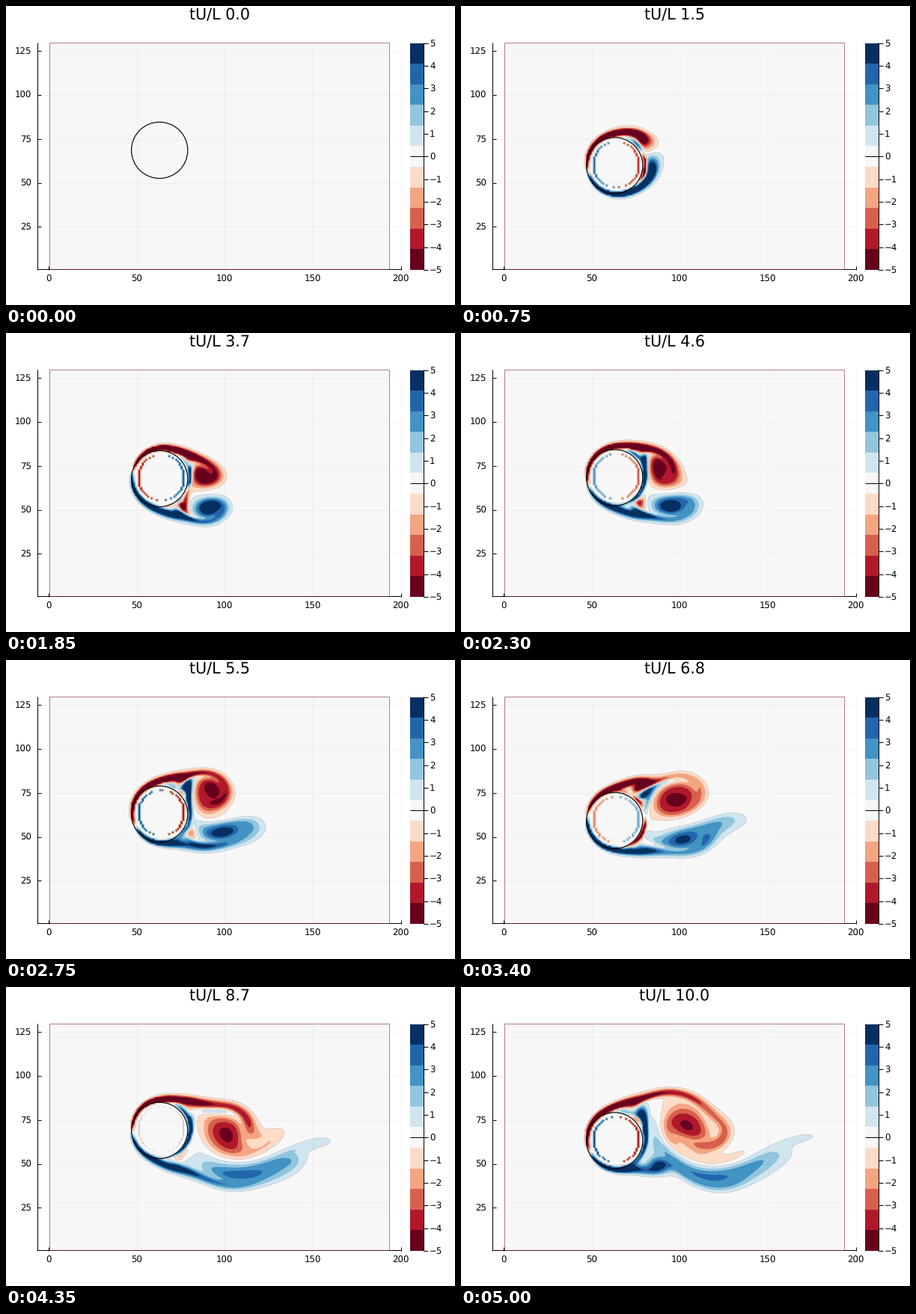
Write a matplotlib script that moves like this. It is 600 px wide and 400 px high and loops after 5.05 s.

```python
import numpy as np
import matplotlib.pyplot as plt
from matplotlib.animation import FuncAnimation
from matplotlib.colors import to_rgb
from matplotlib.patches import Circle, Rectangle

W, H = 600, 400
FRAMES, STEP_MS = 101, 50
FONT = "DejaVu Sans"
PALETTE = ["#67001f", "#b2182b", "#d6604d", "#f4a582", "#fddbc7", "#f7f7f7",
           "#d1e5f0", "#92c5de", "#4393c3", "#2166ac", "#053061"]
plt.rcParams["text.hinting"] = "none"

# ---- flow past a heaving cylinder on a staggered grid (unit cells) ----
N, M = 192, 128
L = R = 16                           # the radius is the length scale
NU = L / 250
SUB = 8
DT = 0.1 * L / SUB
CX, CY = 62.5, 63.0
AMP, OMEGA, PHASE = 5.1, 1.385, 0.43
I0, I1, J0, J1 = 42, 84, 36, 91      # window that always holds the body
F = np.float32


def heave(t):
    return AMP * np.cos(OMEGA * t + PHASE)


def heave_speed(t):
    return -AMP * OMEGA / L * np.sin(OMEGA * t + PHASE)


def cosine_basis(n):
    k = np.arange(n)
    q = np.cos(np.pi * np.outer(k + 0.5, k) / n) * np.sqrt(2 / n)
    q[:, 0] /= np.sqrt(2)
    return q.astype(F), 2 - 2 * np.cos(np.pi * k / n)


QX, LX = cosine_basis(N)
QY, LY = cosine_basis(M)
EIG = LX[:, None] + LY
EIG[0, 0] = np.inf
INV = (-1 / EIG).astype(F)


def poisson(r):
    return QX @ ((QX.T @ r @ QY) * INV) @ QY.T


def median(a, b, c):
    return np.maximum(np.minimum(a, b), np.minimum(np.maximum(a, b), c))


def upwind(far, near, ahead):
    """Limited quadratic value on the face between near and ahead."""
    guess = (5 * near + 2 * ahead - far) * F(1 / 6)
    return median(guess, near, median(10 * near - 9 * far, near, ahead))


def flux(a, p):
    """Advection minus diffusion through faces along axis 0."""
    m, c, d, e = p[:-3], p[1:-2], p[2:-1], p[3:]
    return a * np.where(a > 0, upwind(m, c, d), upwind(e, d, c)) - F(NU) * (d - c)


def rate(u, v):
    p = np.pad(u, 2, "edge")
    fx = flux((u[1:] + u[:-1]) * F(0.5), p[1:-1, 2:-2])
    fy = flux(((v[1:] + v[:-1]) * F(0.5)).T, p[3:-3].T)
    return fx[:-1] - fx[1:] + (fy[:-1] - fy[1:]).T


def window(dx, dy):
    return np.meshgrid(np.arange(I0, I1) + dx, np.arange(J0, J1) + dy, indexing="ij")


GRID_U, GRID_V = window(0, 0.5), window(0.5, 0)
WIN = np.s_[I0:I1, J0:J1]


def immerse(w, grid, y, speed):
    """Blend the velocity with the body's; return the blending weight."""
    rx, ry = grid[0] - CX, grid[1] - y
    r = np.hypot(rx, ry) + 1e-9
    d = np.clip(r - R, -1, 1)
    m0 = 0.5 * (1 + d + np.sin(np.pi * d) / np.pi)
    m1 = (1 - d * d) / 4 - (d * np.sin(np.pi * d)
                            + (1 + np.cos(np.pi * d)) / np.pi) / (2 * np.pi)
    diff = w[WIN] - speed
    gx, gy = np.gradient(diff)
    w[WIN] = speed + m0 * diff + m1 * (rx * gx + ry * gy) / r
    return m0


def vorticity(u, v, t):
    y, z = CY + heave(t), np.zeros((N + 2, M + 2), F)
    u, v = u.copy(), v.copy()
    for w, (gx, gy) in ((u, GRID_U), (v, GRID_V)):
        w[WIN][np.hypot(gx - CX, gy - y) < R - 3] = 0
    z[2:-1, 2:-1] = (v[1:, 1:-1] - v[:-1, 1:-1] - u[1:-1, 1:] + u[1:-1, :-1]) * L
    return np.clip(z, -4.999, 4.999)


def simulate():
    u, v = np.ones((N + 1, M), F), np.zeros((N, M + 1), F)
    mu, mv = np.zeros_like(u), np.zeros_like(v)
    p = np.zeros((N, M), F)
    fields = [np.zeros((N + 2, M + 2), F)]
    old = None

    def push(q):
        u[1:-1] -= mu[1:-1] * (q[1:] - q[:-1])
        v[:, 1:-1] -= mv[:, 1:-1] * (q[:, 1:] - q[:, :-1])

    for n in range((FRAMES - 1) * SUB):
        t = (n + 1) * DT / L
        new = rate(u, v), rate(v.T, u.T).T
        old = old or new
        u[1:-1] += F(DT) * (F(1.5) * new[0] - F(0.5) * old[0])
        v[:, 1:-1] += F(DT) * (F(1.5) * new[1] - F(0.5) * old[1])
        old = new if n else None
        mu[1:-1], mv[:, 1:-1] = 1, 1
        y = CY + heave(t)
        mu[WIN] = immerse(u, GRID_U, y, 0)
        mv[WIN] = immerse(v, GRID_V, y, heave_speed(t))
        push(p)
        for _ in range(2 if n else 12):
            q = F(4 / 3) * poisson(u[1:] - u[:-1] + v[:, 1:] - v[:, :-1])
            push(q)
            if n:
                p += q
        if (n + 1) % SUB == 0:
            fields.append(vorticity(u, v, t))
    return fields


FIELDS = simulate()


# ---- picture, in pixels ----
def px(x):
    return 57 + 2.3525 * x


def py(y):
    return 354 - 2.35 * y


LEFT, RIGHT, TOP, BOTTOM = 58, 513, 49, 353
FINE = 3
COLORS = np.array([to_rgb(c) for c in PALETTE], F)


def hat(s, n):
    """Linear interpolation weights at positions s among n samples."""
    s = np.clip(s, 0, n - 1)
    return np.maximum(0, 1 - np.abs(s[:, None] - np.arange(n))).astype(F)


def subpixels(lo, hi):
    return lo + (np.arange((hi - lo) * FINE) + 0.5) / FINE


HX = hat((subpixels(LEFT, RIGHT) - 57) / 2.3525 - 0.5, N + 2)
HY = hat((354 - subpixels(TOP, BOTTOM)) / 2.35 - 0.5, M + 2)


def paint(z):
    """Colour bands of the field, smoothed from a finer raster."""
    band = ((HY @ z.T @ HX.T) * F(1.1) + F(5.5)).astype(np.uint8)
    return sum(COLORS[band[i::FINE, j::FINE]]
               for i in range(FINE) for j in range(FINE)) / FINE ** 2


fig = plt.figure(figsize=(W / 100, H / 100), dpi=100, facecolor="white")
ax = fig.add_axes([0, 0, 1, 1])
ax.set_xlim(0, W)
ax.set_ylim(H, 0)
ax.axis("off")
PT = 0.72


def line(x, y, color="black", width=1.0, **kw):
    ax.plot(x, y, color=color, lw=width * PT, solid_capstyle="butt", **kw)


def label(x, y, s, size=11.8, ha="center"):
    return ax.text(x, y, s, size=size * PT, family=FONT, ha=ha, va="baseline")


flood = ax.imshow(paint(FIELDS[0]), extent=(LEFT, RIGHT, BOTTOM, TOP), aspect="auto",
                  interpolation="nearest", vmin=0, vmax=1, zorder=0.3)
for x in range(0, 201, 50):
    line([px(x)] * 2, [49, 353], alpha=0.04, zorder=0.5)
    label(px(x), 369, str(x))
for x in (0, 200):
    line([px(x)] * 2, [348, 353])
for y in range(25, 126, 25):
    line([42, 527.5], [py(y)] * 2, alpha=0.04, zorder=0.5)
    line([42, 47], [py(y)] * 2)
    label(34.5, py(y) + 4.3, str(y), ha="right")
line([42, 42], [49, 353])
line([42, 528], [352, 352])
ax.add_patch(Rectangle((LEFT, TOP), 454, 303, fill=False, ec="#8f2a45",
                       lw=0.8 * PT, alpha=0.75, zorder=3))

BAR = np.linspace(353, 49.5, 12)
for color, lo, hi in zip(PALETTE, BAR[:-1], BAR[1:]):
    ax.add_patch(Rectangle((540, hi), 18.5, lo - hi, color=color, lw=0, antialiased=False))
line([558, 558], [49, 353])
for k in range(-5, 6):
    y = 201.25 - 30.35 * k
    line([540 if k == 0 else 558, 564], [y, y])
    label(566, y + 4.3, str(k).replace("-", "\u2212"), ha="left")

title = label(285.5, 18, "", size=20.6)
body = ax.add_patch(Circle((px(63), 0), R * 2.3525, fill=False, ec="black",
                           lw=1.15 * PT, zorder=4))
GX, GY = px(np.arange(N + 2) + 0.5), py(np.arange(M + 2) + 0.5)
rims = []


def draw(k):
    while rims:
        rims.pop().remove()
    t = k / 10
    title.set_text(f"tU/L {t:.1f}")
    body.center = px(63), py(CY + 0.9 + heave(t))
    flood.set_data(paint(FIELDS[k]))
    if k:
        rims.append(ax.contour(GX, GY, FIELDS[k].T, levels=[-5 / 11, 5 / 11],
                               colors="#777777", linewidths=0.3, alpha=0.5,
                               linestyles="solid", zorder=2))
    return [flood, title, body] + rims


anim = FuncAnimation(fig, draw, frames=FRAMES, interval=STEP_MS, repeat=True,
                     repeat_delay=0, blit=False)
plt.show()
```
